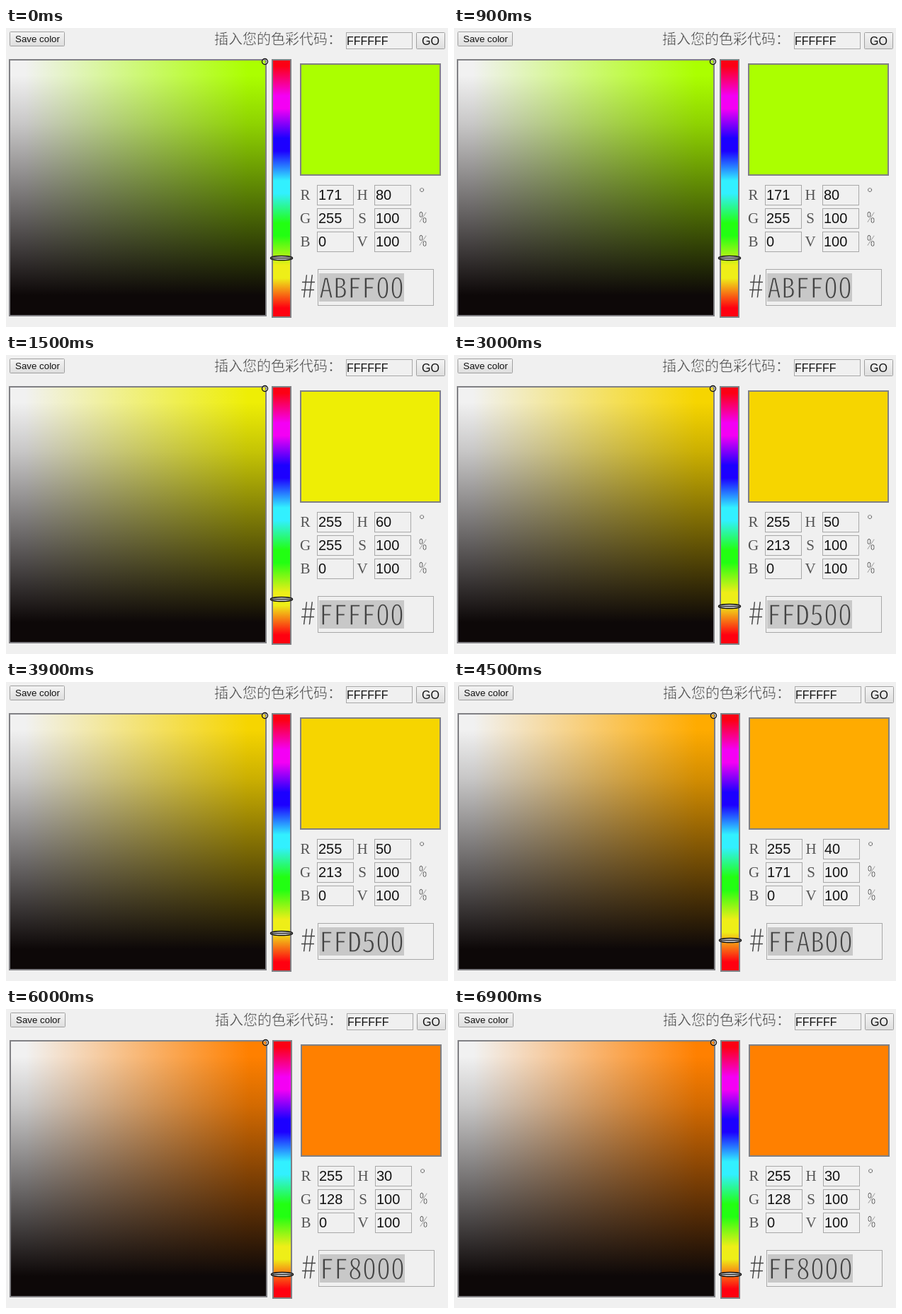
An HTML page that plays this animation: 624x423 px, repeating every 7.5 s.

```html
<!DOCTYPE html>
<html lang="zh-CN">
<head>
<meta charset="utf-8">
<style>
  html, body { margin: 0; width: 100%; height: 100%; overflow: hidden; background: #f0f0f0; }
  svg { display: block; }
  text { white-space: pre; }
  .ui { font-family: "Liberation Sans", Arial, sans-serif; fill: #111; }
  .serif { font-family: "Liberation Serif", "Times New Roman", serif; fill: #555; text-anchor: middle; }
  .cjk { font-family: "Noto Sans CJK SC", "Noto Sans CJK JP", "Noto Sans CJK", sans-serif; font-weight: 300; fill: #444; }
  .mono { font-family: "Noto Sans Mono CJK SC", "Noto Sans Mono CJK JP", "Noto Sans CJK SC", monospace; font-weight: 300; fill: #444; }
  /* A stroke in the background colour thins the letters. */
  .cjk, .mono { stroke: #f0f0f0; stroke-width: .5; }
  .large { stroke-width: 1.3; }
  .selected { stroke: #c8c8c8; }
  .field { fill: #f0f0f0; stroke: #a8a8a8; }
  .button { fill: url(#buttonFill); stroke: #a0a0a0; }
  .frame { fill: none; stroke: #808084; stroke-width: 2; }
</style>
</head>
<body>
<svg width="624" height="423" viewBox="0 0 624 423">
  <defs>
    <linearGradient id="buttonFill" x2="0" y2="1">
      <stop stop-color="#f4f4f4"/><stop offset="1" stop-color="#dedede"/>
    </linearGradient>
    <linearGradient id="saturation">
      <stop offset=".06" stop-color="#f1f1f1"/><stop id="pureStop" offset=".93"/>
    </linearGradient>
    <linearGradient id="shade" x2="0" y2="1">
      <stop offset=".06" stop-color="#0d0808" stop-opacity="0"/>
      <stop offset=".25" stop-color="#0d0808" stop-opacity=".18"/>
      <stop offset=".5" stop-color="#0d0808" stop-opacity=".49"/>
      <stop offset=".92" stop-color="#0d0808"/>
    </linearGradient>
    <linearGradient id="hues" gradientUnits="userSpaceOnUse" x1="0" x2="0" y1="45" y2="405"></linearGradient>
  </defs>
  <g id="panel"></g>
</svg>
<script>
const STEP = 1500;
const states = [
  { hue: 80, hex: 'ABFF00', shown: '#abff00', shift: 0 },
  { hue: 60, hex: 'FFFF00', shown: '#eeee05', shift: 0 },
  { hue: 50, hex: 'FFD500', shown: '#f6d500', shift: 0 },
  { hue: 40, hex: 'FFAB00', shown: '#ffab00', shift: 1 },
  { hue: 30, hex: 'FF8000', shown: '#ff8000', shift: 1 }
];
const $ = id => document.getElementById(id);
const panel = $('panel');

function add(tag, attrs, text = '', parent = panel) {
  const el = document.createElementNS('http://www.w3.org/2000/svg', tag);
  for (const key in attrs) el.setAttribute(key, attrs[key]);
  el.textContent = text;
  return parent.appendChild(el);
}

const rect = (x, y, width, height, attrs) => add('rect', { x, y, width, height, ...attrs });
const box = (x, y, w, h, cls, rx = 0) => rect(x + .5, y + .5, w - 1, h - 1, { class: cls, rx });
const label = (x, y, size, cls, text = '') => add('text', { x, y, 'font-size': size, class: cls }, text);

// Each hue holds for a short band before it blends into the next
['#fc0014', '#f400f4', '#1c00ff', '#32f0ff', '#22ff12', '#eeee18', '#ff0010'].forEach((color, i) => {
  for (const side of [-1, 1]) {
    const offset = Math.min(1, Math.max(0, i / 6 + side * .025));
    add('stop', { offset, 'stop-color': color }, '', $('hues'));
  }
});

box(5, 5, 78, 21, 'button', 1);
label(13, 20, 13.33, 'ui', 'Save color');
label(294, 23, 20, 'cjk', '插入您的色彩代码：');
box(480, 6, 94, 24, 'field');
label(481, 23.5, 16, 'ui', 'FFFFFF');
box(579, 6, 41, 24, 'button', 1);
label(587, 23.5, 16, 'ui', 'GO');

// Saturation and brightness square
rect(5, 45, 362, 362, { fill: 'url(#saturation)' });
rect(5, 45, 362, 362, { fill: 'url(#shade)' });
rect(5, 45, 362, 362, { class: 'frame' });
add('circle', { cx: 365.5, cy: 47.5, r: 4, fill: 'none', stroke: '#111', 'stroke-width': 1.4 });
add('circle', { cx: 365.5, cy: 47.5, r: 2.8, fill: 'none', stroke: '#ddd', 'stroke-opacity': .6 });

// Hue bar and its slider
rect(376, 45, 26, 364, { fill: 'url(#hues)' });
rect(376, 45, 26, 364, { class: 'frame' });
const slider = add('g', {});
add('ellipse', { cx: 389, cy: .5, rx: 15.5, ry: 3, fill: '#ddd', stroke: '#111', 'stroke-width': 1.5 }, '', slider);
add('path', { d: 'M375 .5H403', stroke: '#222', 'stroke-width': 1.4 }, '', slider);

const swatch = rect(416, 51, 197, 157, { class: 'frame' });

const values = {};
['RH°', 'GS%', 'BV%'].forEach(([left, right, unit], row) => {
  const y = 222 + row * 33;
  [[left, 422.5, 439], [right, 503, 520]].forEach(([name, x, fieldX]) => {
    label(x, y + 21, 21, 'serif', name);
    box(fieldX, y, 52, 29, 'field');
    values[name] = label(fieldX + 2, y + 21, 20, 'ui');
  });
  label(583, y + 21, 22, 'mono', unit);
});

label(415, 382, 46, 'mono large', '#');
box(440, 341, 164, 52, 'field');
rect(442, 347, 120, 40, { fill: '#c8c8c8' });
const hexText = label(442, 382, 40, 'mono large selected');

function render(time) {
  const { hue, hex, shown, shift } = states[Math.floor(time / STEP) % states.length];
  panel.setAttribute('transform', `translate(${shift} 0)`);
  $('pureStop').setAttribute('stop-color', shown);
  swatch.style.fill = shown;
  slider.setAttribute('transform', `translate(0 ${405 - hue})`);
  hexText.textContent = hex;
  const [R, G, B] = [0, 2, 4].map(i => parseInt(hex.slice(i, i + 2), 16));
  const numbers = { R, G, B, H: hue, S: 100, V: 100 };
  for (const name in numbers) values[name].textContent = numbers[name];
}

let start;
function tick(now) {
  start ??= now;
  render(now - start);
  requestAnimationFrame(tick);
}
render(0);
requestAnimationFrame(tick);
</script>
</body>
</html>
```
